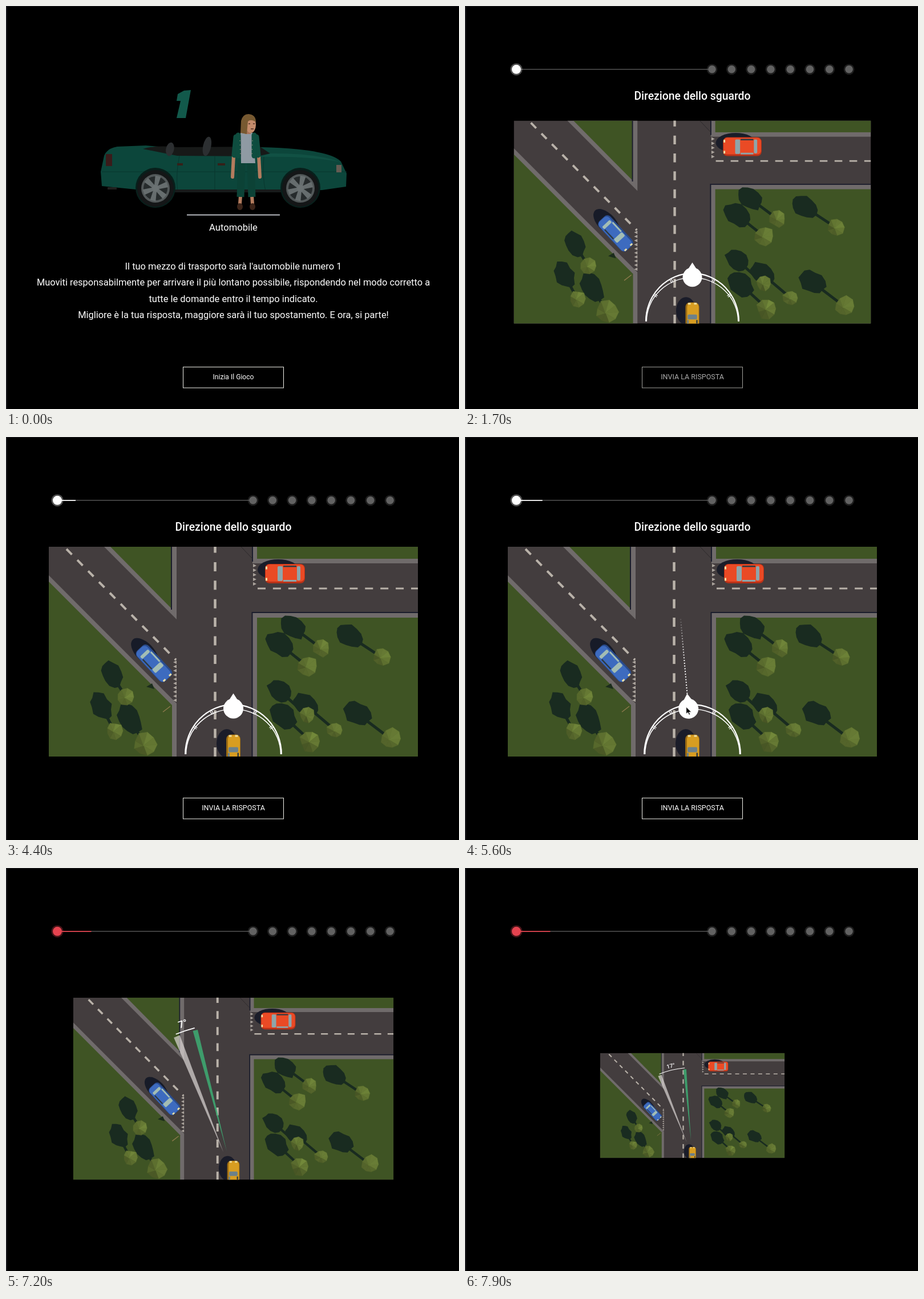
An HTML page that plays this animation: 794 by 705 pixels, repeating every 8 s.

```html
<!DOCTYPE html>
<html lang="it">
<head>
<meta charset="utf-8">
<title>Direzione dello sguardo</title>
<style>
html, body { margin: 0; width: 100%; height: 100%; overflow: hidden; background: #000; }
svg { display: block; width: 794px; height: 705px; }
text { font-family: Roboto, "Open Sans", sans-serif; fill: #fff; text-anchor: middle; }
.title { font-weight: 500; }
.btn { fill: none; stroke: #f2f2ec; }
</style>
</head>
<body>
<svg id="stage" viewBox="0 0 794 705"></svg>
<script>
const LOOP = 8000, STEP = 100, SENT = 6800;
const CX = 398.5, PIVOT_Y = 553, ZOOM_Y = 455.5;
const GUESS = 22, KNOB = 78, WEDGE = 305, DOT_GAP = 34.3, BAR_SPEED = .01143;

let seed = 7;
const rnd = () => (seed = (seed * 16807) % 2147483647) / 2147483647;
const repeat = (n, fn) => Array.from({ length: n }, (_, i) => fn(i)).join('');
const mirror = fn => fn(-1) + fn(1);

const poly = (pts, fill, extra = '') => `<polygon points="${pts}" fill="${fill}" ${extra}/>`;
const rect = (x, y, w, h, fill, extra = '') =>
  `<rect x="${x}" y="${y}" width="${w}" height="${h}" fill="${fill}" ${extra}/>`;
const line = (x1, y1, x2, y2, color, w, extra = '') =>
  `<line x1="${x1}" y1="${y1}" x2="${x2}" y2="${y2}" stroke="${color}" stroke-width="${w}" ${extra}/>`;
const circle = (x, y, r, fill, extra = '') => `<circle cx="${x}" cy="${y}" r="${r}" fill="${fill}" ${extra}/>`;
const oval = (x, y, rx, ry, fill, extra = '') =>
  `<ellipse cx="${x}" cy="${y}" rx="${rx}" ry="${ry}" fill="${fill}" ${extra}/>`;
const path = (d, fill, extra = '') => `<path d="${d}" fill="${fill}" ${extra}/>`;
const text = (x, y, size, str, extra = '') => `<text x="${x}" y="${y}" font-size="${size}" ${extra}>${str}</text>`;
const lines = (y, size, rows) => rows.map((s, i) => text(CX, y + i * size * 1.72, size, s)).join('');
const group = (id, body, extra = '') => `<g id="${id}" ${extra}>${body}</g>`;
const button = (y, size, label) =>
  `<rect class="btn" x="310.5" y="${y + .6}" width="176" height="36.4"/>` + text(CX, y + 22, size, label);

/* Intro */
const wheel = (x, y) => circle(x, y, 32, '#141617') + circle(x, y, 25, '#515758') + circle(x, y, 21, '#262b2c')
  + repeat(6, i => poly('-3,-4 -5,-22 5,-22 3,-4', '#666d6e', `transform="translate(${x} ${y}) rotate(${i * 60 + 12})"`))
  + circle(x, y, 6, '#6b7273');

const seat = (x, y, h) => oval(x + 4, y + h / 2, 7, h / 2, '#2c2f31', `transform="rotate(12 ${x} ${y})"`);

function sideCar() {
  return path('M166 290L172 262Q177 249 195 246L245 244L445 262L447 247Q566 250 587 272L597 293L596 316L554 322L300 326L228 321L168 315Z', '#0c463b')
    + path('M240 250Q262 243 300 247L445 246L463 258L440 263L300 262Z', '#171918')
    + seat(286, 238, 24) + seat(352, 228, 34)
    + path('M463 258Q540 257 587 273Q530 262 445 264Z', '#115144')
    + path('M304 262Q297 295 301 325M366 263V325M452 264Q449 300 455 324M168 290H597', 'none', 'stroke="#08362e"')
    + rect(300, 275, 10, 4, '#352019') + rect(371, 275, 13, 4, '#352019')
    + rect(175, 259, 11, 21, '#3a1b1a') + rect(579, 278, 9, 13, '#655b52')
    + rect(178, 317, 16, 4, '#20201e') + rect(296, 321, 192, 5, '#171a1a')
    + mirror(d => circle(389 + d * 127, 318, 35, '#081f1b') + wheel(389 + d * 127, 319));
}

function woman() {
  const x = 421, skin = '#b47c5e', cloth = '#0e4d3f', round = 'stroke-linecap="round"';
  return mirror(d => line(x + 10 * d, 332, x + 11 * d, 346, skin, 6)
      + oval(x + 11 * d, 351, 5, 6, '#3c2419')
      + line(x + 8 * d, 275, x + 10 * d, 334, '#0c4236', 13)
      + line(x + 22 * d, 262, x + 24 * d, 299, skin, 6, round))
    + poly('411,222 433,222 437,275 412,275', '#8f9aa3')
    + mirror(d => line(x + 18 * d, 229, x + 21 * d, 261, cloth, 9, round)
      + line(x + 14 * d, 226, x + 14 * d, 262, cloth, 9, round)
      + line(x + 11 * d, 235, x + 10 * d, 262, '#8a8f76', 1.3, 'stroke-dasharray="1.5 6"'))
    + rect(419, 212, 10, 12, '#a8735a') + oval(429, 208, 9, 14, '#c48c6c')
    + path('M411 222L412 201Q415 189 425 189Q438 190 438 203Q429 197 424 202L422 224Z', '#775931')
    + path('M425 206H428M433 206H436M429 215H434', 'none', 'stroke="#4d2c22" stroke-width="1.5"');
}

const intro = group('vehicle', sideCar() + woman()
    + poly('324,147 315,196 299,196 306,166 299,166 301,154 312,148', '#12594b'))
  + group('brief', line(317, 365.5, 480, 365.5, '#e9edf5', 1.5)
    + text(CX, 393, 16.6, 'Automobile')
    + lines(461, 16.45, [
      "Il tuo mezzo di trasporto sarà l'automobile numero 1",
      'Muoviti responsabilmente per arrivare il più lontano possibile, rispondendo nel modo corretto a',
      'tutte le domande entro il tempo indicato.',
      'Migliore è la tua risposta, maggiore sarà il tuo spostamento. E ora, si parte!'])
    + button(631, 12.1, 'Inizia Il Gioco'));

/* Question */
const question = group('question',
  poly('452,170 413,491 356,491 388,228 325,230 330,196 426,170', '#2a2a2a')
  + line(281, 282.5, 516, 282.5, '#e6e8cc', 1)
  + lines(361, 17.7, [
    'Qual è l’orientamento dello sguardo ideale per il guidatore?',
    'Toccando la sfera con la freccia, falla scorrere lungo il semicerchio per scegliere',
    'la direzione giusta.'])
  + button(520, 12.6, 'INIZIA'));

/* Progress row */
const dot = (x, r, fill) => circle(x, 110.8, r + 2.6, fill, 'opacity=".3"') + circle(x, 110.8, r, fill);
const row = group('row',
  line(0, 110.8, 427, 110.8, '#7d7d7d', 1, 'id="track"') + line(0, 110.8, 0, 110.8, 'currentColor', 1.8, 'id="bar"')
  + repeat(8, i => dot(433 + i * DOT_GAP, 6.8, '#626262'))
  + group('lead', dot(0, 8, 'currentColor')));

/* Crossroads */
const ring = (n, fn) => Array.from({ length: n }, (_, i) => {
  const a = i / n * Math.PI * 2, [rx, ry] = fn();
  return [Math.cos(a) * rx, Math.sin(a) * ry].map(v => +v.toFixed(1));
});

function shadow(x, y, r) {
  const fill = '#192b20', dx = 10 + .072 * x, dy = 20 + .046 * y;
  const pts = ring(14, () => { const k = .86 + rnd() * .24; return [(r * .5 + 18) * k, (r * .4 + 12) * k]; });
  return line(x, y, x - dx, y - dy, fill, 5)
    + poly(pts.join(' '), fill, `transform="translate(${x - dx} ${y - dy}) rotate(${Math.atan2(dy, dx) * 180 / Math.PI})"`);
}

function canopy(x, y, r) {
  const n = 9, rim = ring(n, () => { const k = r * (.85 + rnd() * .3); return [k, k]; });
  return `<g transform="translate(${x} ${y})">` + rim.map((p, i) => {
    const light = 28 + 5 * Math.cos((i + .5) / n * Math.PI * 2 + .7) + rnd() * 5;
    const fill = `hsl(77 40% ${light.toFixed(0)}%)`;
    return poly(`${-r * .15},${r * .1} ${p} ${rim[(i + 1) % n]}`, fill, `stroke="${fill}" stroke-width=".6"`);
  }).join('') + '</g>';
}

function trees() {
  const list = [[553, 370, 14], [528, 401, 17], [658, 385, 15], [528, 487, 13], [577, 513, 14], [534, 532, 18],
    [674, 528, 18], [210, 455, 14], [190, 514, 14], [244, 538, 20]];
  return list.map(t => shadow(...t)).join('') + list.map(t => canopy(...t)).join('');
}

// Seen from above, nose towards -x
function topCar(x, y, turn, len, w, paint, shade, glass) {
  const f = -len / 2, h = w / 2;
  return `<g transform="translate(${x} ${y}) rotate(${turn})">`
    + rect(f, -h, len, w, shade, 'rx="8"') + rect(f + 1, -h + 1, len - 2, w - 4, paint, 'rx="7"')
    + rect(f + 22, -h + 4, 9, w - 8, glass, 'rx="2"') + rect(f + 56, -h + 4, 6, w - 9, glass, 'rx="2"')
    + rect(f + 32, -h + 3, 23, 2.5, '#2e3a42') + rect(f + 32, h - 6, 23, 3, glass)
    + mirror(d => rect(f + 1, d * (h - 7) - 2.5, 3, 5, '#efe1a5')) + '</g>';
}

const yields = (x, y, n, step, dir) =>
  repeat(n, i => path(`M${x} ${y + i * step}v6l${6 * dir} -3z`, '#aaa39c'));

function crossroads() {
  const grass = '#3f5424', curb = '#706b6b', road = '#433d3e', edge = '#1b1d2c', mark = '#b9b2a9';
  const dashes = (x1, y1, x2, y2, w, on, off) => line(x1, y1, x2, y2, mark, w, `stroke-dasharray="${on} ${off}"`);
  return rect(75, 192, 647, 367, road)
    + poly('75,242 299,466 299,559 75,559', curb) + poly('75,253 291,469 291,559 75,559', grass)
    + poly('172,192 299,192 299,319', curb) + poly('183,192 290,192 290,300', grass)
    + line(290, 192, 290, 302, edge, 2)
    + rect(432, 192, 290, 29, curb) + rect(440, 192, 282, 21, grass) + line(432, 192, 432, 218, edge, 2)
    + rect(432, 308, 290, 251, curb) + rect(440, 316, 282, 243, grass)
    + path('M722 307H431.5V559', 'none', `stroke="${edge}" stroke-width="2"`)
    + line(412, 192, 432, 213, '#2c292b', 1)
    + dashes(366.5, 186.5, 366.5, 559, 4.5, 16, 16.4)
    + dashes(441, 265, 722, 265, 2.8, 14, 12.9)
    + dashes(106, 196, 298, 390, 4, 13.5, 13.5)
    + yields(433, 222, 5, 8, 1) + yields(299, 391, 10, 7.4, -1)
    + trees() + path('M246 437l10 -6l4 10z', '#1b2c1c') + line(275, 481, 288, 471, '#8e7a4d', 1.5)
    + oval(477, 232, 36, 18, '#1a1d29') + topCar(489, 239, 0, 70, 34, '#ea4a25', '#b93218', '#8ea5aa')
    + oval(243, 376, 30, 16, '#171b28', 'transform="rotate(46 243 376)"')
    + topCar(259.5, 396, 227, 73, 28, '#3d6bbf', '#294b8c', '#a3bdb4')
    + oval(387, 536, 18, 25, '#1a1c29') + topCar(CX, 556, 90, 71, 25, '#d89d21', '#9b6b13', '#6d818a');
}

const pivot = a => `translate(${CX} ${PIVOT_Y}) rotate(${-a})`;
const arc = (rx, ry) => `M${CX - rx} 555A${rx} ${ry} 0 0 1 ${CX + rx} 555`;
const dial = group('dial',
  path(arc(84.3, 87), 'none', 'stroke="#fff" stroke-width="2.2"')
  + path(arc(83, 79), 'none', 'stroke="#fff" stroke-width="1.6"')
  + repeat(5, i => mirror(d => line(0, -77, 0, -85, '#fff', 1.2, `transform="${pivot((i - 2) * 28 + d)}"`)))
  + group('handle', line(0, -104, 0, -238, 'url(#fade)', 2, 'id="ray" stroke-dasharray="2 2.8"')
    + circle(0, -KNOB, 17.5, '#fff') + poly('-8,-92 0,-104.5 8,-92', '#fff')));

const wedge = (id, w, fill) => poly([0, -53, -w / 2, -WEDGE, w / 2, -WEDGE], fill, `id="${id}"`);
const scene = group('scene', crossroads() + dial
  + group('gap', wedge('given', 13, 'rgba(226,220,218,.68)') + wedge('right', 10, 'rgba(62,173,116,.85)')
    + path('', 'none', 'id="sweep" stroke="#fff" stroke-width="2"')
    + text(0, 0, 19.7, '', 'id="degrees" class="title"')), 'clip-path="url(#frame)"');

const stage = document.getElementById('stage');
stage.innerHTML = `<defs><clipPath id="frame"><rect x="75" y="192" width="647" height="367"/></clipPath>
  <linearGradient id="fade" gradientUnits="userSpaceOnUse" x1="0" y1="-104" x2="0" y2="-238">
  <stop offset=".4" stop-color="#fff"/><stop offset="1" stop-color="#fff" stop-opacity=".1"/></linearGradient></defs>`
  + rect(0, 0, 794, 705, '#000') + rect(0, 0, 2, 705, '#1b1b1f') + rect(0, 0, 794, 1, '#1b1b1f')
  + intro + question + scene + row
  + text(CX, 0, 20, 'Direzione dello sguardo', 'id="heading" class="title"')
  + group('send', button(631, 12.5, 'INVIA LA RISPOSTA'))
  + path('M0 0V12L3 9.5L5 14L7 13L5 9H9Z', '#000', 'id="cursor" stroke="#fff" stroke-width=".8"');

/* Motion */
const el = {};
stage.querySelectorAll('[id]').forEach(n => el[n.id] = n);
const set = (id, attrs) => { for (const k in attrs) el[id].setAttribute(k, attrs[k]); };
const show = (id, o) => set(id, { opacity: o, visibility: o > 0 ? 'visible' : 'hidden' });

const part = (t, from, to) => Math.min(1, Math.max(0, (t - from) / (to - from)));
const mix = (a, b, p) => a + (b - a) * p;
const inOut = p => p * p * (3 - 2 * p);
const out = p => 1 - (1 - p) ** 2;
const fadeIn = (t, from) => part(t, from, from + 300);
const fadeOut = (t, from) => 1 - fadeIn(t, from);
const polar = (a, r) => [CX - r * Math.sin(a * Math.PI / 180), PIVOT_Y - r * Math.cos(a * Math.PI / 180)];
const zoomAt = (y, s) => `translate(${CX} ${y}) scale(${s}) translate(${-CX} ${-y})`;

function moveCursor(t, angle) {
  const [kx, ky] = polar(angle, KNOB);
  const arrive = out(part(t, 5000, 5500)), leave = inOut(part(t, 6300, 6700));
  const x = mix(mix(432, kx - 4, arrive), 400, leave), y = mix(mix(700, ky - 3, arrive), 646, leave);
  set('cursor', { transform: `translate(${x} ${y})` });
  show('cursor', t >= 5000 && t < SENT ? 1 : 0);
}

function showGap(t) {
  const gap = 20 * out(part(t, 6850, 8550)), mid = GUESS - gap / 2;
  show('gap', t > SENT ? 1 : 0);
  set('given', { transform: pivot(GUESS) });
  set('right', { transform: pivot(GUESS - gap) });
  set('sweep', { d: `M${polar(GUESS, 310)}A310 310 0 0 1 ${polar(GUESS - gap, 310)}` });
  set('degrees', { transform: `translate(${polar(mid, 318)}) rotate(${-mid})` });
  el.degrees.textContent = Math.round(gap) + '°';
}

function draw(t) {
  show('vehicle', fadeOut(t, 0));
  show('brief', fadeOut(t, 50));
  show('question', fadeIn(t, 400) * fadeOut(t, 1000));

  const lift = inOut(part(t, 1100, 1600));
  show('heading', fadeIn(t, 400) * fadeOut(t, 6900));
  set('heading', { y: mix(263, 164, lift), 'font-size': mix(22.7, 19.35, lift) });

  const x = mix(433 - DOT_GAP, 90, inOut(part(t, 1100, 1700)));
  show('row', fadeIn(t, 400));
  set('row', { transform: zoomAt(0, mix(.45, 1, out(part(t, 400, 950)))), color: t > SENT ? '#e5434f' : '#fff' });
  set('lead', { transform: `translate(${x} 0)` });
  set('track', { x1: x });
  set('bar', { x1: x, x2: x + Math.max(0, Math.min(t, SENT) - 1600) * BAR_SPEED });

  const grow = mix(.6, 1, out(part(t, 1200, 1900))), shrink = mix(1, .49, inOut(part(t, SENT, LOOP)));
  show('scene', fadeIn(t, 1200));
  set('scene', { transform: zoomAt(ZOOM_Y, grow * shrink) });

  const angle = 23.8 * out(part(t, 5500, 6400));
  show('dial', fadeOut(t, 6900));
  set('handle', { transform: pivot(angle) });
  show('ray', t > 5500 && t < SENT ? 1 : 0);
  moveCursor(t, angle);
  showGap(t);

  show('send', fadeIn(t, 1500) * fadeOut(t, 6900));
  set('send', { transform: `translate(0 ${3.6 * (Math.max(0, t - SENT) / 100) ** 2})` });
}

const start = performance.now();
function tick() {
  const t = (performance.now() - start) % LOOP;
  draw(Math.floor(t / STEP) * STEP);
  requestAnimationFrame(tick);
}
tick();
</script>
</body>
</html>
```
